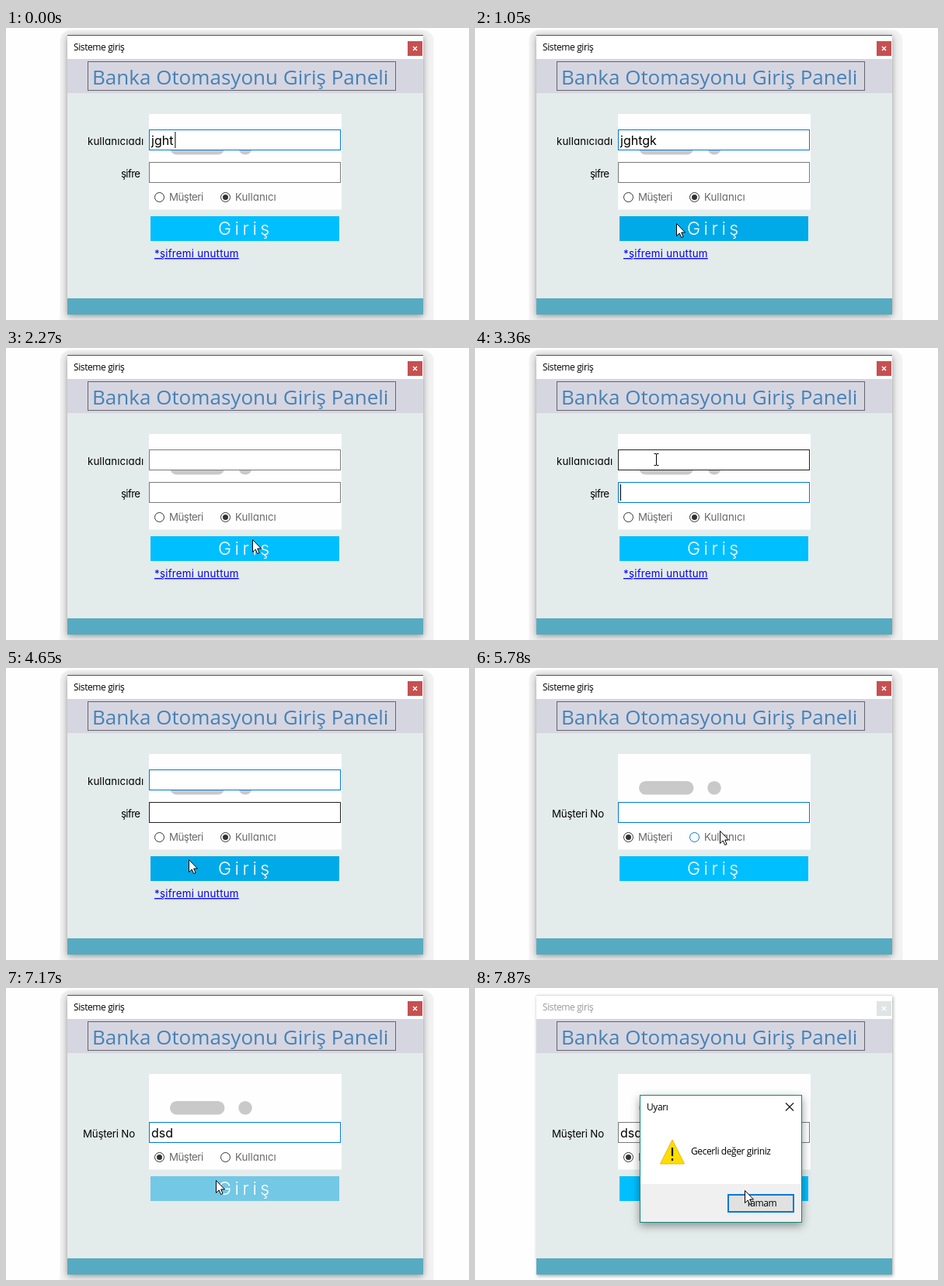
An HTML page for the animation above (8000 ms loop, 596x377 px).

```html
<!DOCTYPE html>
<html lang="tr">
<head>
<meta charset="utf-8">
<style>
html, body { margin: 0; width: 100%; height: 100%; overflow: hidden; background: #fefefe }
svg { display: block }
text { font: 12px "Open Sans", "Noto Sans", sans-serif; letter-spacing: -.4px; white-space: pre }
text.g { font: 13.3px Inter, sans-serif; font-feature-settings: "cv11"; letter-spacing: 0 }
text.in { font-size: 16px }
text.head { font-size: 26px; letter-spacing: 0; fill: #4682b4 }
text.big { font-size: 23px; font-weight: 300; letter-spacing: 4.5px; fill: #fff }
.radio text { fill: #696969 }
.radio circle { fill: #fff; stroke: #333 }
.radio .dot { fill: #333; stroke: none }
.field { fill: #fff; stroke: #7a7a7a }
.dialog { filter: drop-shadow(0 4px 6px #0006) }
</style>
</head>
<body>
<svg width="596" height="377" viewBox="0 0 596 377">
  <rect id="halo" x="69.500" y="2.500" width="481" height="400" rx="14" fill="#f2f2f2"/>
  <g id="frame">
    <rect x="79" y="9" width="458" height="361" fill="#e4ebeb"/>
  </g>
  <rect x="79" y="10" width="458" height="30" fill="#fff"/>
  <rect id="edge" x="79" y="9" width="458" height="1" fill="#555"/>
  <text id="title" x="87" y="29">Sisteme giriş</text>
  <rect id="close" x="517" y="17" width="19" height="19"/>
  <path d="M524 24l5 5m0-5l-5 5" stroke="#fff" stroke-width="1.500"/>
  <rect x="79" y="40" width="458" height="44" fill="#d6d6e1"/>
  <rect x="105.500" y="43.500" width="396" height="37" fill="none" stroke="#64646e"/>
  <text class="head" x="111" y="73">Banka Otomasyonu Giriş Paneli</text>
  <rect x="79" y="349" width="458" height="21" fill="#57abc0"/>

  <rect x="184" y="111" width="248" height="123.500" fill="#fefefe"/>
  <rect x="211" y="146" width="70.500" height="17.500" rx="8.750" fill="#c8c9c8"/>
  <circle cx="308" cy="154.700" r="8.800" fill="#c8c9c8"/>

  <g id="userRow">
    <text class="g" x="105" y="151" style="letter-spacing:.1px">kullanıcıadı</text>
    <rect id="user" class="field" x="184.500" y="131.500" width="246" height="26"/>
    <text id="userText" class="g in" x="187" y="151"></text>
    <text class="g" x="148" y="193" style="letter-spacing:-.65px">şifre</text>
    <text class="g" x="191" y="296" fill="#00f" text-decoration="underline" style="letter-spacing:.25px">*şifremi unuttum</text>
  </g>
  <text id="customer" class="g" x="99" y="193" style="letter-spacing:-.2px">Müşteri No</text>
  <rect id="pass" class="field" x="184.500" y="173.500" width="246" height="26"/>
  <text id="passText" class="g in" x="187" y="193"></text>
  <rect id="caret" width="1" height="21"/>

  <g class="radio">
    <circle id="ring1" cx="197.500" cy="218.500" r="6"/>
    <circle id="ring2" cx="282.500" cy="218.500" r="6"/>
    <circle id="dot" class="dot" cy="218.500" r="3.500"/>
    <text class="g" x="210" y="223" style="letter-spacing:-.5px">Müşteri</text>
    <text class="g" x="295" y="223">Kullanıcı</text>
  </g>
  <rect id="button" x="186" y="243" width="243" height="32"/>
  <text class="g big" x="273" y="267">Giriş</text>

  <g id="dialogs"></g>
  <g id="cursor">
    <path id="arrow" d="M.5.500V16.500L4.200 13l2.500 5.500 2.400-1L6.700 12H11.500z" fill="#fff" stroke="#000"/>
    <path id="beam" d="M-3-7.500h2.500l.5.500.5-.5H3M-3 7.500h2.500l.5-.5.5.5H3M0-7V7" fill="none" stroke="#000"/>
  </g>
</svg>
<script>
const $ = id => document.getElementById(id);
const set = (id, name, value) => $(id).setAttribute(name, value);
const show = (id, on) => set(id, 'opacity', +on);

const dialog = (id, x, w, message) => `<g id="${id}" class="dialog">
  <rect x="${x + .5}" y="138.500" width="${w - 1}" height="164" fill="#fff" stroke="#14897b"/>
  <rect x="${x + 1}" y="253" width="${w - 2}" height="49" fill="#f0f0f0"/>
  <text x="${x + 9}" y="158">Uyarı</text>
  <path d="M${x + w - 21} 148.500l10 10m0-10l-10 10" stroke="#111" stroke-width="1.100"/>
  <path d="M${x + 42} 196l15.500 31h-31z" fill="#ffdd00" stroke="#eeb410" stroke-linejoin="round"/>
  <path d="M${x + 42} 206v11m0 3v3" stroke="#111" stroke-width="2.200"/>
  <text x="${x + 66}" y="215">${message}</text>
  <rect x="${x + w - 95}" y="267" width="84" height="22" fill="#e1e1e1" stroke="#0078d7" stroke-width="2"/>
  <text x="${x + w - 72}" y="282">Tamam</text></g>`;
$('dialogs').innerHTML = dialog('retry', 226, 182, 'Tekrar deneyin')
  + dialog('invalid', 212, 209, 'Gecerli değer giriniz');

// The screen refreshes only at these moments: [first, last, count]
const ticks = [[0, 0, 1], [280, 1320, 9], [1450, 1450, 1], [1720, 2520, 7], [2820, 3630, 7],
  [4220, 4220, 1], [4500, 5470, 8], [5630, 6340, 6], [6740, 7750, 8], [7870, 7870, 1]]
  .flatMap(([a, b, n]) => Array.from({ length: n }, (_, i) => a + (b - a) * i / Math.max(1, n - 1)));

// Pointer path: time, x, y
const path = [[540, 236, 165], [800, 258, 250], [1060, 260, 254], [1320, 291, 259], [1720, 303, 262],
  [1987, 350, 274], [2120, 350, 274], [2520, 250, 192], [2820, 248, 193], [3090, 243, 188], [3360, 233, 144],
  [4220, 233, 144], [4500, 234, 190], [4639, 235, 247], [4777, 232, 244], [5054, 222, 215], [5331, 222, 214],
  [5470, 240, 214], [5772, 315, 210], [5914, 314, 219], [6740, 300, 228], [6884, 284, 244], [7173, 270, 248],
  [7462, 272, 249], [7606, 295, 251], [7750, 334, 252], [7870, 347, 261]];

function pointAt(t) {
  const i = path.findIndex(p => p[0] >= t);
  if (i < 1) return path[i < 0 ? path.length - 1 : 0].slice(1);
  const [a, b] = [path[i - 1], path[i]], k = (t - a[0]) / (b[0] - a[0]);
  return [1, 2].map(j => Math.round(a[j] + (b[j] - a[j]) * k));
}

function draw(t) {
  const s = Math.round(ticks.filter(v => v <= t + 6).pop());
  const within = (a, b) => s >= a && s < b;
  const first = within(1320, 2120), second = s >= 7600, idle = first || second;
  const customer = s >= 5325;

  show('halo', !idle);
  $('frame').style.filter = idle ? 'drop-shadow(1px 2px 2px #0005)' : 'drop-shadow(0 2px 4px #0006)';
  set('edge', 'fill', idle ? '#ddd' : '#555');
  set('title', 'fill', idle ? '#999' : '#000');
  set('close', 'fill', idle ? '#dfe4e4' : '#c75050');

  show('userRow', !customer);
  show('customer', customer);
  $('userText').textContent = s < 2120 ? 'jghtgkgh'.slice(0, s < 280 ? 4 : s < 410 ? 5 : 6) : '';
  $('passText').textContent = 'dsd'.slice(0, s < 6050 ? 0 : s < 6190 ? 1 : s < 6340 ? 2 : 3);

  const userFocus = s < 1060 || within(3630, 5325);
  const passFocus = within(2820, 3630) || customer && !second;
  const stroke = (focus, hover) => focus ? '#0078d7' : hover ? '#222' : '#7a7a7a';
  $('user').style.stroke = stroke(userFocus, within(3225, 3630));
  $('pass').style.stroke = stroke(passFocus, within(2387, 2820) || within(4500, 4770));

  const userCaret = s < 930 || within(3630, 4220);
  show('caret', userCaret || within(2820, 3630) || within(6050, 6340));
  set('caret', 'x', userCaret || s < 6050
    ? 187 + (s < 930 ? $('userText').getComputedTextLength() + 2 : 0)
    : 189 + $('passText').getComputedTextLength());
  set('caret', 'y', userCaret ? 134 : 176);

  set('dot', 'cx', customer ? 197.5 : 282.5);
  $('ring1').style.stroke = within(5050, 5470) ? '#0078d7' : '#333';
  $('ring2').style.stroke = within(5625, 6050) ? '#0078d7' : '#333';
  const pressed = within(1060, 1320) || within(7170, 7460);
  const hover = within(800, 1060) || within(4630, 4910) || within(6880, 7170);
  set('button', 'fill', pressed ? '#73c8e6' : hover ? '#00aae8' : '#00bfff');

  set('retry', 'opacity', first ? (s < 1450 ? .6 : 1) : 0);
  set('invalid', 'opacity', second ? (s < 7750 ? .6 : 1) : 0);

  const beam = s < 800 || within(2387, 4630);
  const [x, y] = pointAt(s);
  show('cursor', s >= 540 && !within(6050, 6740));
  show('beam', beam);
  show('arrow', !beam);
  set('cursor', 'transform', `translate(${beam ? x + .5 : x} ${y})`);
}

const start = performance.now();
(function loop() {
  draw((performance.now() - start) % 8000);
  requestAnimationFrame(loop);
})();
</script>
</body>
</html>
```
